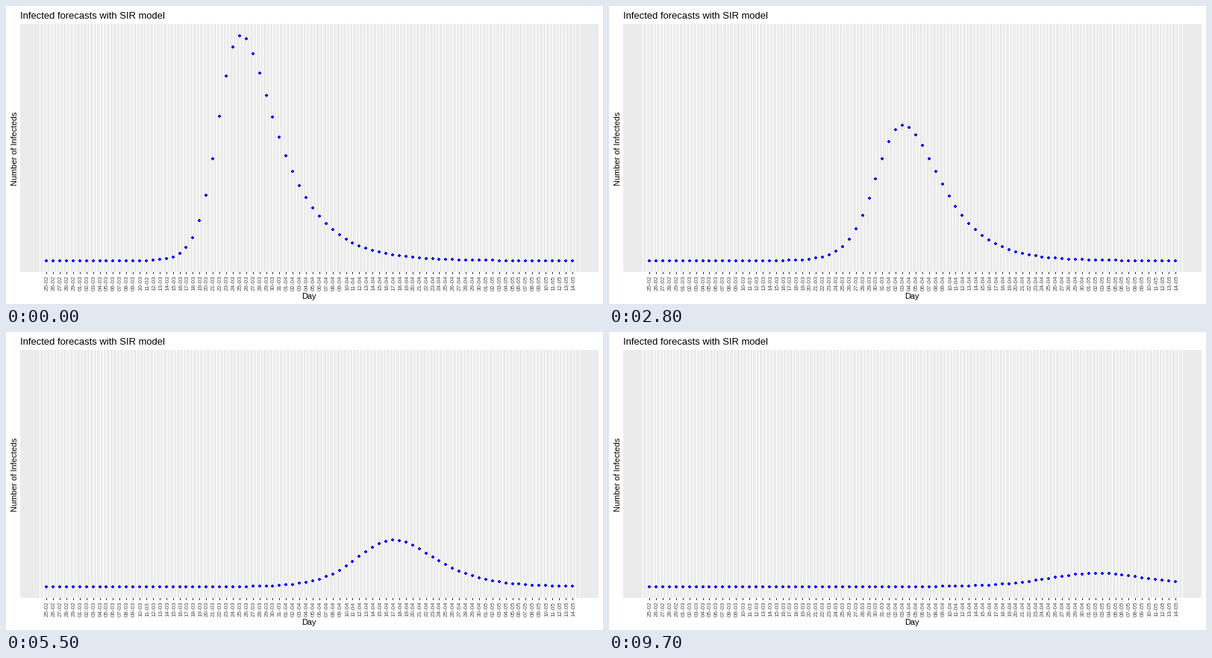
These frames come from a looping animation (800 px wide and 400 px high, 10000 ms). A matplotlib script:

```python
import matplotlib.pyplot as plt
import numpy as np
from matplotlib.animation import FuncAnimation
from matplotlib.collections import PolyCollection

W, H = 800, 400
LEFT, TOP, RIGHT, BOTTOM = 19, 24, 794, 357   # plot panel
DAYS = np.arange(80)
BASE = 342        # y of zero infected
POP = 751         # whole population, in pixels
SEED = 7.8e-8     # infected share on the first day

# (forecast number, day of the peak, height of the peak)
KEYS = [(0, 29.22, 303), (3, 34.58, 220.5), (8, 38.17, 182.3), (14, 50, 109),
        (21, 55, 30), (26, 60.2, 24), (31, 67.2, 18.2)]

plt.rcParams["font.family"] = "Liberation Sans"


def day_x(d):
    return np.round(54.16 + 8.92 * d)


def forecasts():
    """Infected per day, in pixels, one row for each SIR forecast."""
    num, day, height = np.array(KEYS).T
    n = np.arange(32)
    day = np.interp(n, num, day)
    height = np.exp(np.interp(n, num, np.log(height)))

    # reproduction number that gives the wanted peak
    grid = np.linspace(1.05, 5, 4000)
    r0 = np.interp(height / POP, 1 - (1 + np.log(grid)) / grid, grid)

    def slope(y):  # y = -ln(susceptible share), time in recovery periods
        return r0 * (SEED - np.expm1(-y)) - y

    h = 0.03
    u = np.arange(0, 75, h)
    y = np.zeros((len(u), len(n)))
    for k in range(len(u) - 1):
        a = slope(y[k])
        b = slope(y[k] + h / 2 * a)
        c = slope(y[k] + h / 2 * b)
        d = slope(y[k] + h * c)
        y[k + 1] = y[k] + h / 6 * (a + 2 * b + 2 * c + d)
    infected = POP * (SEED - np.expm1(-y) - y / r0)

    curves = []
    for j in n:
        u_peak = np.interp(np.log(r0[j]), y[:, j], u)
        curves.append(np.interp(DAYS * u_peak / day[j], u, infected[:, j]))
    return np.array(curves)


CURVES = forecasts()


def curve_at(k):
    """First forecasts are joined by one halfway step, later ones cut."""
    if k >= 22:
        return CURVES[6 + (k - 22) // 3]
    n, phase = divmod(k + 2, 4)
    if phase == 0:
        return (CURVES[n - 1] + CURVES[n]) / 2
    return CURVES[n]


fig = plt.figure(figsize=(W / 72, H / 72), dpi=72, facecolor="white")
ax = fig.add_axes([0, 0, 1, 1])
ax.set_xlim(0, W)
ax.set_ylim(H, 0)
ax.axis("off")


def box(x0, y0, x1, y1):
    return [(x0, y0), (x1, y0), (x1, y1), (x0, y1)]


def fill(boxes, color):
    shapes = PolyCollection(boxes, facecolors=color, edgecolors="none",
                            linewidths=0, snap=False)
    ax.add_collection(shapes, autolim=False)
    return shapes


def label(x, y, s, size, color="black", angle=0):
    ax.text(x, y, s, size=size, color=color, rotation=angle,
            rotation_mode="anchor", ha="left", va="baseline")


fill([box(LEFT, TOP, RIGHT, BOTTOM)], "#EBEBEB")
fill([box(x, TOP, x + 1, BOTTOM) for x in day_x(np.arange(-1, 80.5, 0.5))],
     "white")
fill([box(x, BOTTOM, x + 1, BOTTOM + 3) for x in day_x(DAYS)], "#333333")

label(18.7, 17, "Infected forecasts with SIR model", 13)
label(15, 241, "Number of Infecteds", 11, angle=90)
label(396, 393, "Day", 11)

spans = [(2, 25, 29), (3, 1, 31), (4, 1, 30), (5, 1, 14)]
dates = [f"{d:02d}-{m:02d}" for m, a, b in spans for d in range(a, b + 1)]
for x, s in zip(day_x(DAYS), dates):
    label(x + 3, 381.5, s, 8, "#4D4D4D", 90)

dots = fill([], "#0000FF")


def update(k):
    # each dot is a wide and a tall bar: four pixels with cut corners
    centres = list(zip(day_x(DAYS), np.round(BASE - curve_at(k))))
    dots.set_verts([box(x - a, y - b, x + a, y + b)
                    for x, y in centres for a, b in ((2, 1), (1, 2))])
    return (dots,)


anim = FuncAnimation(fig, update, frames=100, interval=100, repeat=True,
                     repeat_delay=0, init_func=lambda: update(0))
plt.show()
```
